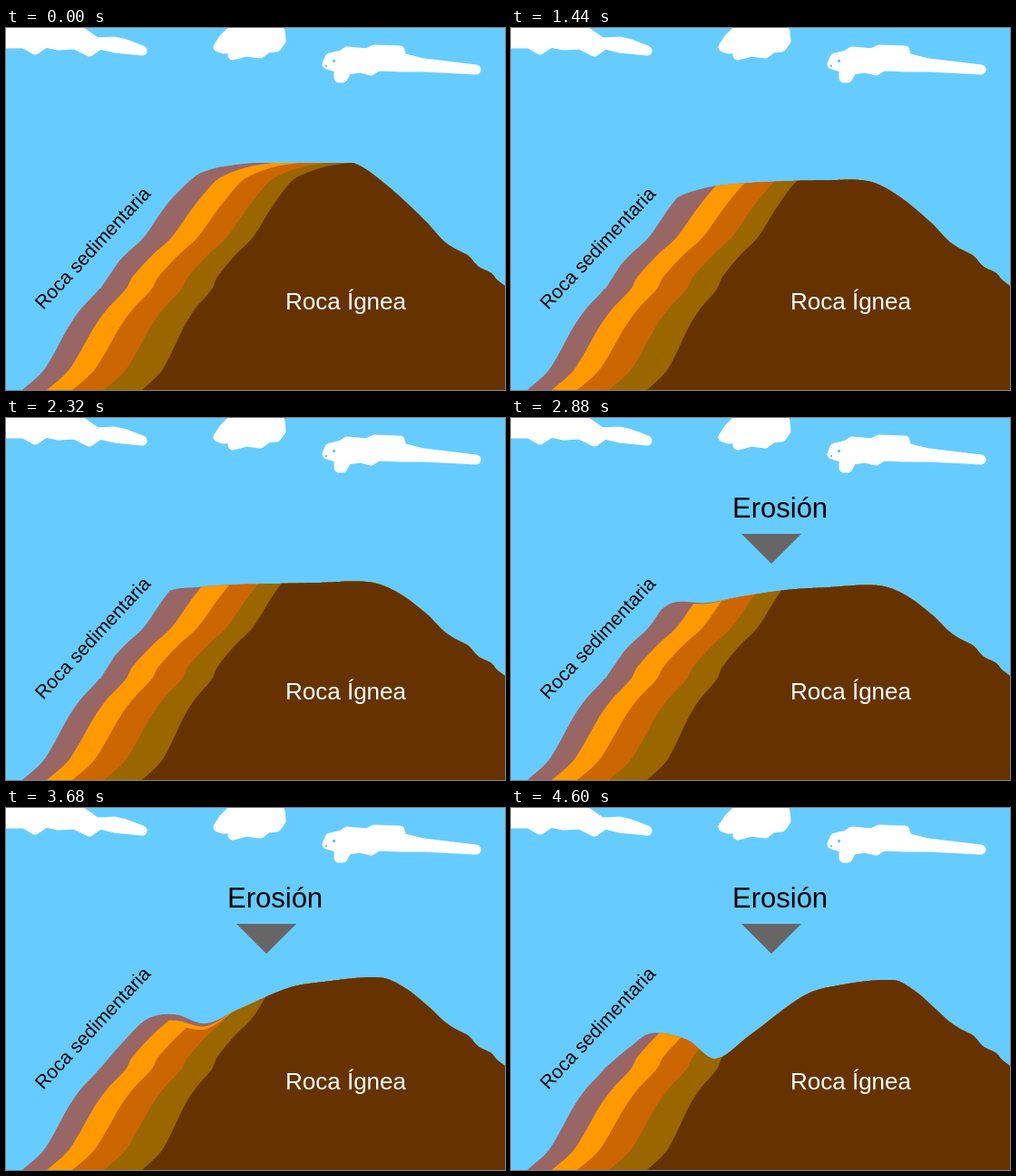
Recreate the animation shown at these times as an HTML page. Size 550 px wide and 400 px high, loop 5.44 s.

```html
<!DOCTYPE html>
<html lang="es">
<head>
<meta charset="utf-8">
<title>Erosión</title>
<style>
html, body { margin: 0; width: 100%; height: 100%; overflow: hidden; background: #6cf; }
svg { display: block; width: 550px; height: 400px; font-family: Arial, "Liberation Sans", sans-serif; }
.clouds { fill: #fff; stroke: #fff; stroke-width: 11; stroke-linejoin: round; }
</style>
</head>
<body>
<svg viewBox="0 0 550 400">
  <rect width="550" height="400" fill="#6cf"/>
  <g class="clouds">
    <path d="M-8 5H84L100 16 120 15 129 17 150 25 120 22 103 18 92 26 76 18 58 19 44 16 32 24 20 17 -8 17Z"/>
    <path d="M234 21 240 12 248 4H302L303 14 298 21 288 22 280 28 265 26 250 30 252 22 240 23Z"/>
    <path d="M354 40 357 33 370 30 376 26 398 28 406 24 434 25 436 33 460 39 518 46 460 43 436 43 410 42 402 47 390 44 376 46 371 55H367L367 44Z"/>
  </g>
  <path d="M360 35h3v3h-3zM352 41h2v2h-2z" fill="#6cf"/>
  <g id="rocks"></g>
  <text x="308" y="311" font-size="26" fill="#fff">Roca Ígnea</text>
  <text transform="translate(41 312) rotate(-47)" font-size="21">Roca sedimentaria</text>
  <g id="erosion" visibility="hidden">
    <text x="244" y="110" font-size="31">Erosión</text>
    <path d="M254 128H320L287 161Z" fill="#666"/>
  </g>
</svg>
<script>
const LOOP = 5440, STEP = 40, EROSION = 2520, END = 4600;
const WIDTH = 550, GROUND = 400;
const byId = id => document.getElementById(id);
const points = text => text.split(' ').map(p => p.split(',').map(Number));
const lerp = (a, b, k) => a + (b - a) * k;
const clamp = v => Math.max(0, Math.min(1, v));

// Left slope of the outermost layer; the others are shifted copies of it.
const slope = points('18,400 40,380 51,363 69,330 83,310 103,288 109,276 131,251 152,231 175,198 198,170 213,161 237,153 262,149');

// Skyline when fresh, worn flat and cut by the valley.
const skylines = [
  '104,288 131,249 163,212 187,184 213,161 240,153 300,147 345,146 385,150 420,174 462,213',
  '104,288 129,249 158,213 176,193 213,189 245,187 300,186 345,185 402,184 432,194 464,217',
  '104,287 130,265 154,249 194,256 225,277 262,252 320,209 350,198 421,190 445,202 470,224'
].map(points);
const rightSlope = points('482,235 495,244 510,252 520,263 535,271 541,278 550,285');

// Height of a smooth curve through pts at x.
function heightAt(pts, x) {
  const last = pts.length - 1;
  if (x <= pts[0][0]) return pts[0][1];
  if (x >= pts[last][0]) return pts[last][1];
  const i = pts.findIndex(p => p[0] > x) - 1;
  const tangent = n => {
    const a = pts[Math.max(n - 1, 0)], b = pts[Math.min(n + 1, last)];
    return (b[1] - a[1]) / (b[0] - a[0]);
  };
  const [x0, y0] = pts[i], [x1, y1] = pts[i + 1];
  const w = x1 - x0, k = (x - x0) / w, j = 1 - k;
  return j * j * (1 + 2 * k) * y0 + k * k * (1 + 2 * j) * y1
    + w * k * j * (j * tangent(i) - k * tangent(i + 1));
}

// Colour, then the shift from the outer slope at its foot and at its top.
const layers = [
  ['#966', 0, 0], ['#f90', 27, 32], ['#c60', 55, 61], ['#960', 90, 92], ['#630', 132, 116]
].map(([fill, foot, top]) => {
  const path = document.createElementNS('http://www.w3.org/2000/svg', 'path');
  path.setAttribute('fill', fill);
  byId('rocks').appendChild(path);
  const edge = slope.map(([x, y]) => [x + lerp(foot, top, clamp((GROUND - y) / 230)), y]);
  const heights = Array.from({ length: WIDTH + 1 }, (_, x) => heightAt(edge, x));
  return { path, heights, left: edge[0][0] };
});

function draw(time) {
  const phase = time < EROSION ? 0 : 1;
  const k = phase ? clamp((time - EROSION) / (END - EROSION)) : time / EROSION;
  const moving = skylines[phase].map(([x, y], n) => {
    const [nx, ny] = skylines[phase + 1][n];
    return [lerp(x, nx, k), lerp(y, ny, k)];
  });
  const skyline = [...moving, ...rightSlope];
  const sky = layers[0].heights.map((_, x) => heightAt(skyline, x));
  // While the valley opens, the layers bend beneath the surface.
  const bend = phase * 7 * Math.sin(Math.PI * k) ** 2;

  layers.forEach(({ path, heights, left }, n) => {
    let d = `M${left},${GROUND}`;
    for (let x = left + 1; x <= WIDTH; x++) {
      const cover = n * bend * clamp((250 - x) / 65);
      d += `L${x},${Math.max(heights[x], sky[x] + cover).toFixed(1)}`;
    }
    path.setAttribute('d', `${d}V${GROUND}Z`);
  });
  byId('erosion').setAttribute('visibility', phase ? 'visible' : 'hidden');
}

const start = performance.now();
let shown = -1;
function tick() {
  const time = Math.floor((performance.now() - start) % LOOP / STEP) * STEP;
  if (time !== shown) draw(shown = time);
  requestAnimationFrame(tick);
}
tick();
</script>
</body>
</html>
```
